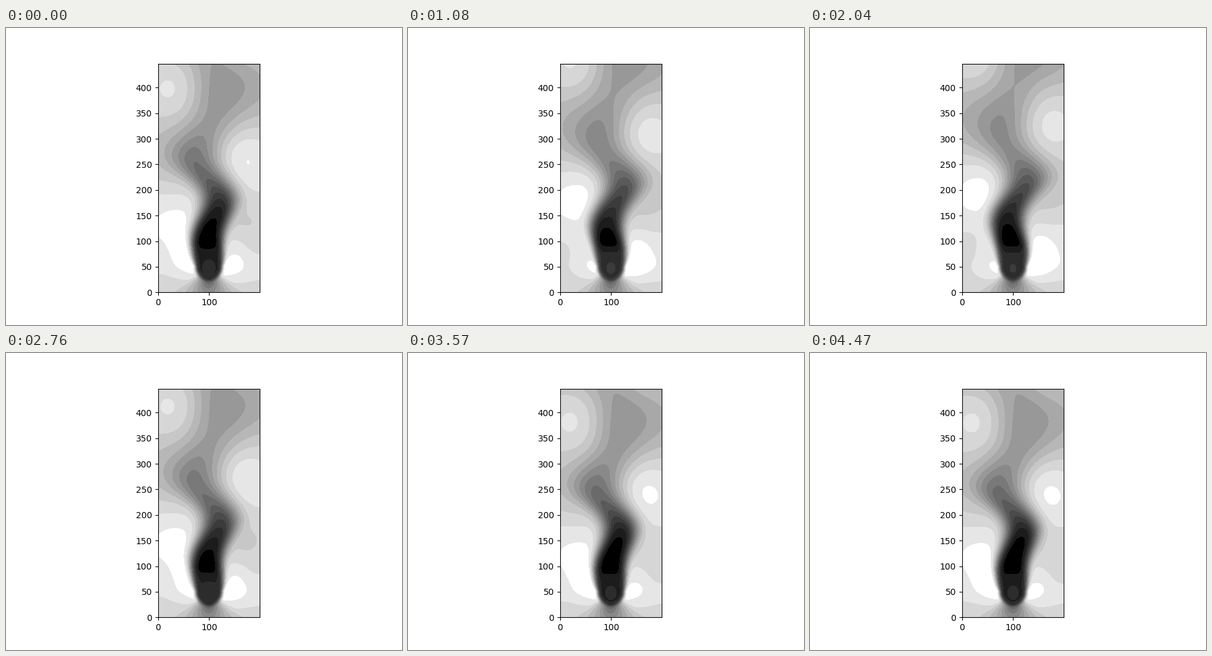
Recreate the animation shown at these times as a matplotlib script. Size 640x480 px, loop 4.5 s.

```python
import numpy as np
import matplotlib.pyplot as plt
from matplotlib.animation import FuncAnimation

FRAMES, STEP = 150, 30
PERIOD = 905                 # ms for one shedding cycle
CX, CY, RADIUS = 99.5, 50, 26

X, Y = np.meshgrid(np.linspace(0, 199, 100), np.linspace(0, 447, 224))
DX, DY = X - CX, Y - CY
BEHIND = np.maximum(DY, 0)
AHEAD = np.minimum(DY, 0)

# Sixteen bands: black, an even ramp of greys, white
GREYS = np.concatenate(([0], np.linspace(28, 230, 14), [255])) / 255


def bell(v, centre, size):
    return np.exp(-((v - centre) / size)**2)


def rise(v, centre, size):
    return 1 / (1 + np.exp((centre - v) / size))


def wave(phase, y0, length):
    """Pattern carried along the channel, with its crest at y0 for phase 0."""
    return np.cos(2 * np.pi * (phase - (Y - y0) / length))


def pulse(phase):
    """Symmetric part of the motion, twice per cycle."""
    return np.cos(4 * np.pi * phase)


# Open flow: slow fan ahead of the cylinder, fast strips beside it
R2 = np.maximum(DX**2 + DY**2, RADIUS**2)
COS2 = (DY**2 - DX**2) / R2
SLOW = np.where(DY < 0, np.maximum(COS2 + .45, 0), 0) * RADIUS / np.sqrt(R2)
FAST = np.maximum(-COS2, 0) * RADIUS**2 / R2 * bell(BEHIND, 0, 25)
STRIPS = bell(abs(DX), 52, 25) * bell(Y, 78, 38)
OPEN = 14.2 - bell(Y, 0, 30) - 1.9 * rise(Y, 270, 45)
AROUND = 2.6 * FAST - 6 * SLOW + STRIPS

# Wake: depth, half width and edge sharpness along the channel
DEPTH = 2 + 12 / (1 + (Y / 218)**5.5)
WIDTH = 34 + 18 * rise(Y, 225, 22) - 6.5 * np.exp(-BEHIND / 20)
POWER = 2 + 7 * np.exp(-BEHIND / 55)
SWAY = 24 * bell(Y, 225, 107) * np.tanh(BEHIND / 40)
REACH = bell(Y, 165, 40)
SHIELD = 1 - rise(Y, 200, 20)

# Antisymmetric side pattern, strongest between wake and wall
U = DX / 65
SIDES = 2.2 * (1 - np.exp(-Y / 160)) * U * np.exp((1 - U**2) / 2)

# Faint shading inside the cylinder
NEAR = np.exp(-(DY / 38)**4)
BODY = (.8 * bell(DX, 0, 14) * bell(Y, 44, 20)
        - .4 * bell(abs(DX), 24, 5) * bell(Y, 42, 15))


def field(phase):
    dx = DX + SWAY * wave(phase, 277, 208)
    wake = np.exp(-(np.hypot(dx, AHEAD) / WIDTH)**POWER)
    depth = DEPTH + .9 * REACH * pulse(phase - .9)
    body = NEAR * (1.9 - .45 * pulse(phase - .95)) + BODY
    sides = AROUND + SIDES * wave(phase, 262, 275)
    tone = OPEN + sides * (1 - wake * SHIELD) + (body - depth) * wake
    return np.clip(tone, .01, 15.99)


fig, ax = plt.subplots(figsize=(6.4, 4.8), dpi=100)
ax.set_aspect("equal")
ax.set(xlim=(0, 199), ylim=(0, 447),
       xticks=[0, 100], yticks=range(0, 401, 50))
shown = []


def draw(i):
    while shown:
        shown.pop().remove()
    shown.append(ax.contourf(X, Y, field(i * STEP / PERIOD),
                             levels=range(17),
                             colors=[str(g) for g in GREYS]))
    return shown


anim = FuncAnimation(fig, draw, frames=FRAMES, interval=STEP,
                     repeat=True, repeat_delay=0, blit=False)
plt.show()
```
